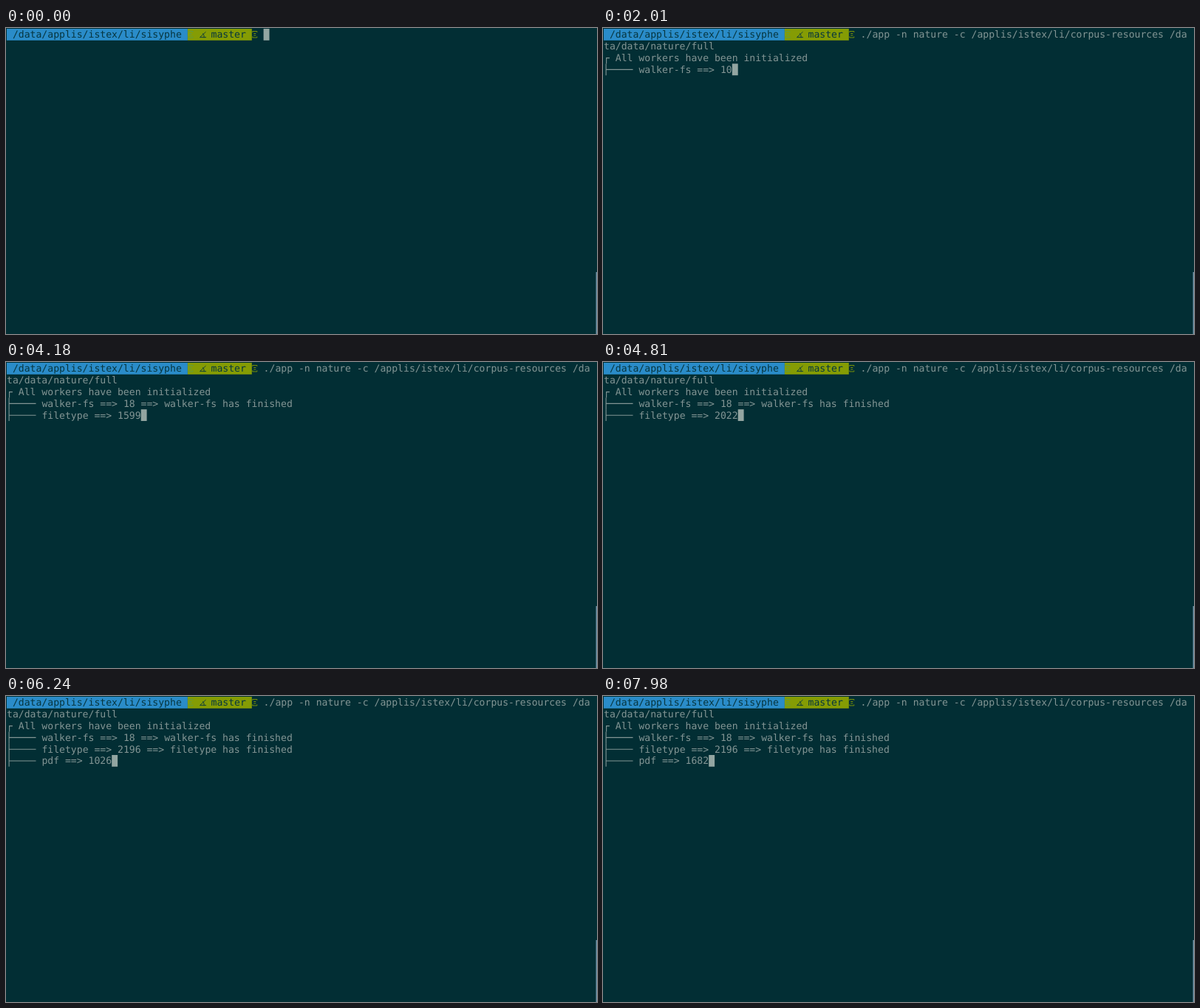
An HTML page for the animation above (8000 ms loop, 800 by 415 pixels).

```html
<!DOCTYPE html>
<html lang="en">
<head>
<meta charset="utf-8">
<title>Terminal session</title>
<style>
  html, body { margin: 0; width: 100%; height: 100%; overflow: hidden; background: #022e34; }
  svg { display: block; width: 100vw; height: 100vh; }
  text {
    font: 13.12px "DejaVu Sans Mono", monospace;
    white-space: pre;
    text-rendering: geometricPrecision;
    fill: #839594;
  }
  .dark { fill: #07363f; }
  .line { fill: none; stroke: #839594; stroke-width: 1.1; }
</style>
</head>
<body>
<svg id="stage" viewBox="0 0 800 415" xmlns="http://www.w3.org/2000/svg">
  <rect width="800" height="415" fill="#022e34"/>
  <rect x="798.6" y="331" width="1.4" height="84" fill="#7597ad"/>
</svg>
<script>
const LOOP = 8000;
const CELL_W = 7.9, CELL_H = 15.8, BASELINE = 12.4;
const SAMPLE_START = 2273.6, SAMPLE_STEP = 52.87;
const COMMAND = "./app -n nature -c /applis/istex/li/corpus-resources /data/data/nature/full";
const WRAP = 56;

// [time, count] points, linear in between
const FILETYPE = [[2270, 64], [3010, 681], [4180, 1599], [5070, 2196]];
const PDF = [[5340, 39], [6130, 984], [6240, 1026], [6920, 1300], [7079, 1300], [7980, 1682]];

const stage = document.getElementById("stage");
const colX = col => 1 + col * CELL_W;
const rowY = row => 1 + row * CELL_H;

function add(tag, attrs) {
  const node = document.createElementNS(stage.namespaceURI, tag);
  for (const name in attrs) node.setAttribute(name, attrs[name]);
  return stage.appendChild(node);
}

function addText(col, row, content = "", cls = "") {
  const node = add("text", { x: colX(col), y: rowY(row) + BASELINE, class: cls });
  node.textContent = content;
  return node;
}

function addBar(col, end, fill) {
  return add("rect", { x: colX(col), y: rowY(0), width: (end - col) * CELL_W, height: CELL_H, fill });
}

// Placeholder box for the separator glyph
function addSeparator(col, stroke) {
  const x = colX(col);
  add("path", {
    d: `M${x + 1} 6V4.5H${x + 7}V6M${x + 2.5} 7.5H${x + 5.5}M${x + 2.5} 10H${x + 5.5}M${x + 1} 11.5V13H${x + 7}V11.5`,
    fill: "none", stroke, "stroke-width": 0.9
  });
}

function addBranch(row) {
  const y = rowY(row);
  return add("path", {
    d: `M4.1 ${y}v${CELL_H}M4.1 ${y + 8}H${colX(5)}`, class: "line"
  });
}

addBar(0, 31, "#2a8cc9");
addBar(31, 42, "#859c04");
addText(1, 0, "/data/applis/istex/li/sisyphe", "dark");
addSeparator(31, "#5f9a46");
add("path", {
  d: "M270.5 5.2L262.5 12.6H271M266.3 7.3Q268.6 9.4 268.2 13.2",
  fill: "none", stroke: "#07363f", "stroke-width": 0.9
});
addText(35, 0, "master", "dark");
addSeparator(42, "#859c04");

const cursor = add("rect", { width: CELL_W, height: CELL_H, fill: "#93a5a1" });
const typed = addText(44, 0);
const wrapped = addText(0, 1);
const header = addText(2, 2);
const corner = add("path", {
  d: `M4.6 ${rowY(3)}V${rowY(2) + 8}H${colX(1)}`, class: "line"
});
const workers = [3, 4, 5].map(row => ({ row, branch: addBranch(row), label: addText(6, row) }));

function show(node, visible) {
  node.setAttribute("visibility", visible ? "visible" : "hidden");
}

function moveCursor(col, row) {
  cursor.setAttribute("x", colX(col));
  cursor.setAttribute("y", rowY(row));
}

function countAt(points, t) {
  if (t <= points[0][0]) return points[0][1];
  for (let i = 1; i < points.length; i++) {
    const [t0, v0] = points[i - 1], [t1, v1] = points[i];
    if (t <= t1) return Math.round(v0 + (v1 - v0) * (t - t0) / (t1 - t0));
  }
  return points[points.length - 1][1];
}

// Counters refresh at a fixed rate, on whole hundredths of a second
function sampleTime(t) {
  const k = Math.max(0, Math.floor((t - SAMPLE_START + 5) / SAMPLE_STEP));
  return Math.round((SAMPLE_START + k * SAMPLE_STEP) / 10) * 10;
}

function progress(name, count, done) {
  return `${name} ==> ${count}` + (done ? ` ==> ${name} has finished` : "");
}

function workerLines(t) {
  const s = sampleTime(t);
  const lines = ["", "", ""];
  if (t >= 2010) lines[0] = progress("walker-fs", t < 2060 ? 10 : 18, t >= 2270);
  // The line is wiped just before its final state is written
  const wiped = t >= 5130 && t < 5340;
  if (t >= 2270 && !wiped) lines[1] = progress("filetype", countAt(FILETYPE, s), t >= 5340);
  if (t >= 5340) lines[2] = progress("pdf", countAt(PDF, s), false);
  return lines;
}

function render(t) {
  const length = t < 260 ? 0 : t < 370 ? 1 : t < 580 ? 2 : COMMAND.length;
  typed.textContent = COMMAND.slice(0, Math.min(length, WRAP));
  wrapped.textContent = length > WRAP ? COMMAND.slice(WRAP, length) : "";

  const started = t >= 2010;
  header.textContent = started ? "All workers have been initialized" : "";
  show(corner, started);

  const lines = workerLines(t);
  workers.forEach(({ branch, label }, i) => {
    label.textContent = lines[i];
    show(branch, lines[i] !== "");
  });

  if (t < 1480) {
    if (length > WRAP) moveCursor(length - WRAP, 1);
    else moveCursor(44 + length, 0);
  } else if (!started) {
    moveCursor(0, 2);
  } else {
    const active = t < 2270 ? 0 : t < 5340 ? 1 : 2;
    const line = lines[active];
    moveCursor(line ? 6 + line.length : 0, workers[active].row);
  }
}

const start = performance.now();
function frame() {
  render((performance.now() - start) % LOOP);
  requestAnimationFrame(frame);
}
render(0);
requestAnimationFrame(frame);
</script>
</body>
</html>
```
